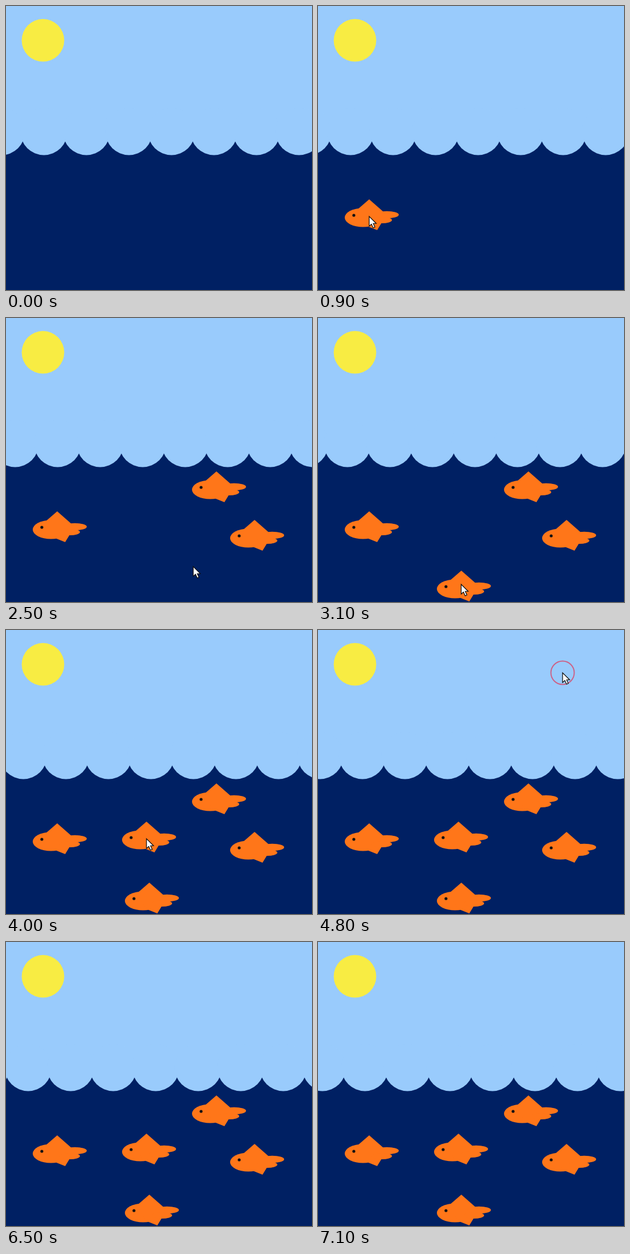
Recreate the animation shown at these times as an HTML page with a canvas. Size 538 by 498 pixels, loop 7.2 s.

```html
<!DOCTYPE html>
<html>
<head>
<meta charset="utf-8">
<title>Fish pond</title>
<style>
  html, body { margin: 0; width: 100%; height: 100%; overflow: hidden; }
  canvas { display: block; }
</style>
</head>
<body>
<canvas width="538" height="498"></canvas>
<script>
const ctx = document.querySelector('canvas').getContext('2d');
const LOOP = 7200, STEP = 100, HOLD = 300;
const SKY = '#99cbfc', WATER = '#002063', SUN = '#f8ec43', FISH = '#ff7619';
const SURFACE = 238, CREST = 74.75, SCALLOP = 41.5;

// Where the pointer enters, clicks and leaves: [time, x, y]
const enter = [0, 60, 530], leave = [6300, -30, 240];
const clicks = [[700, 90, 369], [1300, 370, 299], [1950, 437, 384], [2700, 252, 473],
  [3700, 247, 366], [4800, 430, 75], [5700, 121, 191]];
const stops = [enter, ...clicks, leave];

const smooth = f => f * f * (3 - 2 * f);

// The pointer rests after each stop, then eases to the next one
function pointerAt(t) {
  const next = stops.findIndex(s => s[0] > t);
  if (next < 0) return leave.slice(1);
  const [t0, x0, y0] = stops[next - 1], [t1, x1, y1] = stops[next];
  const f = smooth(Math.max(0, (t - t0 - HOLD) / (t1 - t0 - HOLD)));
  return [x0 + (x1 - x0) * f, y0 + (y1 - y0) * f];
}

// The waves drift right, a little slower in the middle of the loop
function crestAt(t) {
  const s = t / 1000;
  return 29.3 + 59.5 * s + 13.1 * (Math.min(s, 1.9) + Math.max(0, s - 5.8));
}

function oval(x, y, rx, ry, color) {
  ctx.fillStyle = color;
  ctx.beginPath();
  ctx.ellipse(x, y, rx, ry, 0, 0, 2 * Math.PI);
  ctx.fill();
}

function polygon(points, color) {
  ctx.fillStyle = color;
  ctx.beginPath();
  points.forEach(p => ctx.lineTo(...p));
  ctx.closePath();
  ctx.fill();
}

function at([x, y], draw) {
  ctx.save();
  ctx.translate(x, y);
  draw();
  ctx.restore();
}

function waves(t) {
  const centerY = SURFACE - Math.sqrt(SCALLOP ** 2 - (CREST / 2) ** 2);
  ctx.fillStyle = WATER;
  ctx.fillRect(0, centerY, 538, 498);
  for (let x = crestAt(t) % CREST - CREST / 2; x < 538 + CREST; x += CREST) {
    oval(x, centerY, SCALLOP, SCALLOP, SKY);
  }
}

function fish() {
  oval(-11, 2, 32, 16.5, FISH);
  polygon([[0, -30], [-22, -11], [-6, 16], [14, 24], [22, 11], [30, 2], [24, -9]], FISH);
  oval(31, -3, 21, 6.2, FISH);
  oval(22, 6.5, 18, 5.5, FISH);
  oval(-27, -2, 2.6, 2.6, '#111');
}

function arrow() {
  polygon([[0, 0], [0, 17], [4, 13.5], [7, 20], [10, 18.7], [7.2, 12.4], [12.3, 12.2]], '#fff');
  ctx.strokeStyle = '#111';
  ctx.lineWidth = 1.3;
  ctx.stroke();
}

function ring(age) {
  ctx.strokeStyle = '#d94a6ccc';
  ctx.lineWidth = 2 + 1.8 * age;
  ctx.beginPath();
  ctx.arc(0, 0, 20.5 + 4.8 * age, 0, 2 * Math.PI);
  ctx.stroke();
}

function render(t) {
  ctx.fillStyle = SKY;
  ctx.fillRect(0, 0, 538, 498);
  waves(t);
  oval(65, 60.2, 37.4, 37.4, SUN);

  // Only a click below the surface adds a fish
  const done = clicks.filter(c => c[0] <= t);
  for (const [, x, y] of done) if (y > SURFACE) at([x, y], fish);
  for (const [start, x, y] of done) {
    const age = (t - start) / STEP;
    if (age < 2) at([x, y], () => ring(age));
  }
  at(pointerAt(t), arrow);
}

const begin = performance.now();
function tick() {
  const t = (performance.now() - begin) % LOOP;
  render(Math.floor(t / STEP) * STEP);
  requestAnimationFrame(tick);
}
tick();
</script>
</body>
</html>
```
